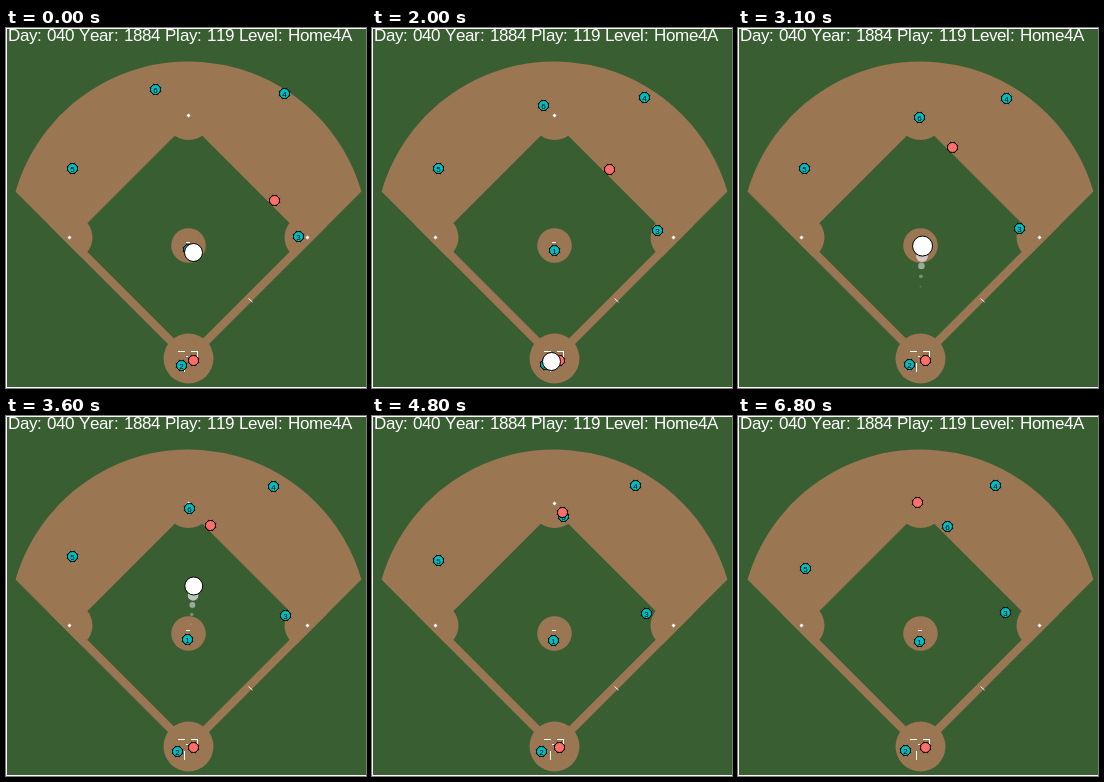
These frames come from a looping animation (360 px wide and 360 px high, 6.9 s). An HTML page with a canvas:

```html
<!DOCTYPE html>
<html lang="en">
<head>
<meta charset="utf-8">
<title>Baseball play</title>
<style>
html, body { margin: 0; width: 100%; height: 100%; overflow: hidden; background: #fff; }
canvas { display: block; width: 360px; height: 360px; }
</style>
</head>
<body>
<canvas id="stage" width="360" height="360"></canvas>
<script>
const ctx = document.getElementById('stage').getContext('2d');
const LOOP = 6900, STEP = 100, LAST = LOOP / STEP - 1;
const GRASS = '#385e32', DIRT = '#9b7653', TEAL = '#00bfc4', SALMON = '#ff6f69';
const TAU = Math.PI * 2;
const CAPTION = 'Day: 040 Year: 1884 Play: 119 Level: Home4A';

const lerp = (a, b, k) => a + (b - a) * k;

// Straight runs between points given as [progress, x, y]
function route(u, ...points) {
  let i = 0;
  while (i < points.length - 2 && u > points[i + 1][0]) i++;
  const [a, b] = [points[i], points[i + 1]];
  const k = (u - a[0]) / (b[0] - a[0]);
  return [lerp(a[1], b[1], k), lerp(a[2], b[2], k)];
}

// Positions for a progress u from 0 to 1
const fielders = [
  u => [182 - u, 221 + 4 * u],
  u => [175 - 8 * u, 337 - 3 * u],
  u => [292 - 25 * u, 196 + 12 * Math.pow(1 - u, 1.8)],
  u => [278 - 21 * u, 65 + 4 * u + 22 * u * (1 - u) ** 2],
  u => [66 + Math.max(0, u - 0.5), 140 + 28 * Math.max(0, u - 0.57)],
  u => route(u, [0, 149, 61], [0.3, 171, 77], [0.46, 181, 89], [0.6, 185, 96], [1, 209, 110])
];
const batter = u => [187, 332 - u];
const runner = u => route(u, [0, 268, 172], [0.3, 236, 140], [0.6, 194, 100], [1, 179, 86]);

function disc(x, y, r, fill, outline) {
  ctx.beginPath();
  ctx.arc(x, y, r, 0, TAU);
  ctx.fillStyle = fill;
  ctx.fill();
  if (outline) {
    ctx.strokeStyle = '#000';
    ctx.lineWidth = 1;
    ctx.stroke();
  }
}

function diamond(x, y, r, fill) {
  ctx.beginPath();
  ctx.moveTo(x - r, y);
  ctx.lineTo(x, y - r);
  ctx.lineTo(x + r, y);
  ctx.lineTo(x, y + r);
  ctx.fillStyle = fill;
  ctx.fill();
}

// Letters advance by whole pixels
function drawCaption() {
  ctx.font = '17px "Liberation Sans", Arial, sans-serif';
  ctx.textAlign = 'left';
  ctx.fillStyle = '#fff';
  let x = 2;
  for (const ch of CAPTION) {
    ctx.fillText(ch, x, 13);
    x += Math.round(ctx.measureText(ch).width - 0.1);
  }
}

function drawField() {
  ctx.fillStyle = '#fff';
  ctx.fillRect(0, 0, 360, 360);
  ctx.fillStyle = GRASS;
  ctx.fillRect(1, 1, 359, 358);

  ctx.save();
  ctx.translate(0.5, 0.5);
  ctx.save();
  ctx.beginPath();
  ctx.moveTo(182, 336);
  ctx.lineTo(9, 163);
  ctx.arc(182, 213, 180, Math.atan2(-50, -173), Math.atan2(-50, 173));
  ctx.closePath();
  ctx.fillStyle = DIRT;
  ctx.fill();
  ctx.clip();
  diamond(182, 209, 115.5, GRASS);
  disc(63, 209, 23, DIRT);
  disc(301, 209, 23, DIRT);
  disc(182, 87.5, 24, DIRT);
  ctx.restore();

  disc(182, 330, 25, DIRT);
  disc(182, 217, 17.3, DIRT);
  diamond(63, 209, 2, '#fff');
  diamond(301, 209, 2, '#fff');
  diamond(182, 87, 2, '#fff');
  ctx.strokeStyle = '#fff';
  ctx.lineWidth = 1;
  ctx.beginPath();
  ctx.moveTo(242, 270);
  ctx.lineTo(246, 273.5);
  ctx.stroke();
  ctx.restore();

  ctx.fillStyle = '#fff';
  ctx.fillRect(180, 214, 4, 1);
  ctx.fillRect(172, 323, 7, 1);
  ctx.fillRect(185, 323, 7, 1);
  ctx.fillRect(191, 323, 1, 7);
  ctx.fillRect(178, 335, 1, 9);
  ctx.fillRect(180, 328, 2, 1);
  drawCaption();
}

// A pitch to the plate, then a throw to second; size follows the height
function ballAt(n) {
  if (n >= 0 && n <= 10)
    return { x: 187 - 0.7 * n, y: 224 + 12.1 * n, r: 9 + 0.2 * n - 0.07 * n * n };
  const t = n - 20;
  if (t >= 0 && t <= 23)
    return {
      x: 179 + 0.335 * t + 0.0113 * t * t,
      y: 333 - 11.1 * t + 0.055 * t * t,
      r: 9 + 0.296 * t - 0.0186 * t * t
    };
  return null;
}

function drawBall(n) {
  const ball = ballAt(n);
  if (!ball) return;
  for (let i = 4; i > 0; i--) {
    const past = ballAt(n - i);
    if (past) disc(past.x + 0.5, past.y + 0.5, ball.r * 1.05 * Math.pow(0.56, i),
      `rgba(225,225,225,${0.98 - 0.2 * i})`);
  }
  disc(ball.x + 0.5, ball.y + 0.5, ball.r, '#fff', true);
}

function drawPlayer([px, py], fill, label) {
  const x = Math.round(px) + 0.5, y = Math.round(py) + 0.5;
  disc(x, y, 5, fill, true);
  // knobs around the rim
  for (let i = 0; i < 8; i++) {
    const a = (i + 0.5) / 8 * TAU;
    ctx.fillStyle = '#000';
    ctx.fillRect(x + 5.6 * Math.cos(a) - 0.5, y + 5.6 * Math.sin(a) - 0.5, 1, 1);
  }
  if (!label) return;
  ctx.font = '8px "Liberation Sans", Arial, sans-serif';
  ctx.textAlign = 'center';
  ctx.fillText(label, x, y + 3);
}

function draw(n) {
  const u = n / LAST;
  drawField();
  fielders.forEach((place, i) => drawPlayer(place(u), TEAL, String(i + 1)));
  drawPlayer(batter(u), SALMON);
  drawPlayer(runner(u), SALMON);
  drawBall(n);
}

const start = performance.now();
function tick() {
  const t = Math.max(0, performance.now() - start) % LOOP;
  draw(Math.floor(t / STEP));
  requestAnimationFrame(tick);
}
tick();
</script>
</body>
</html>
```
